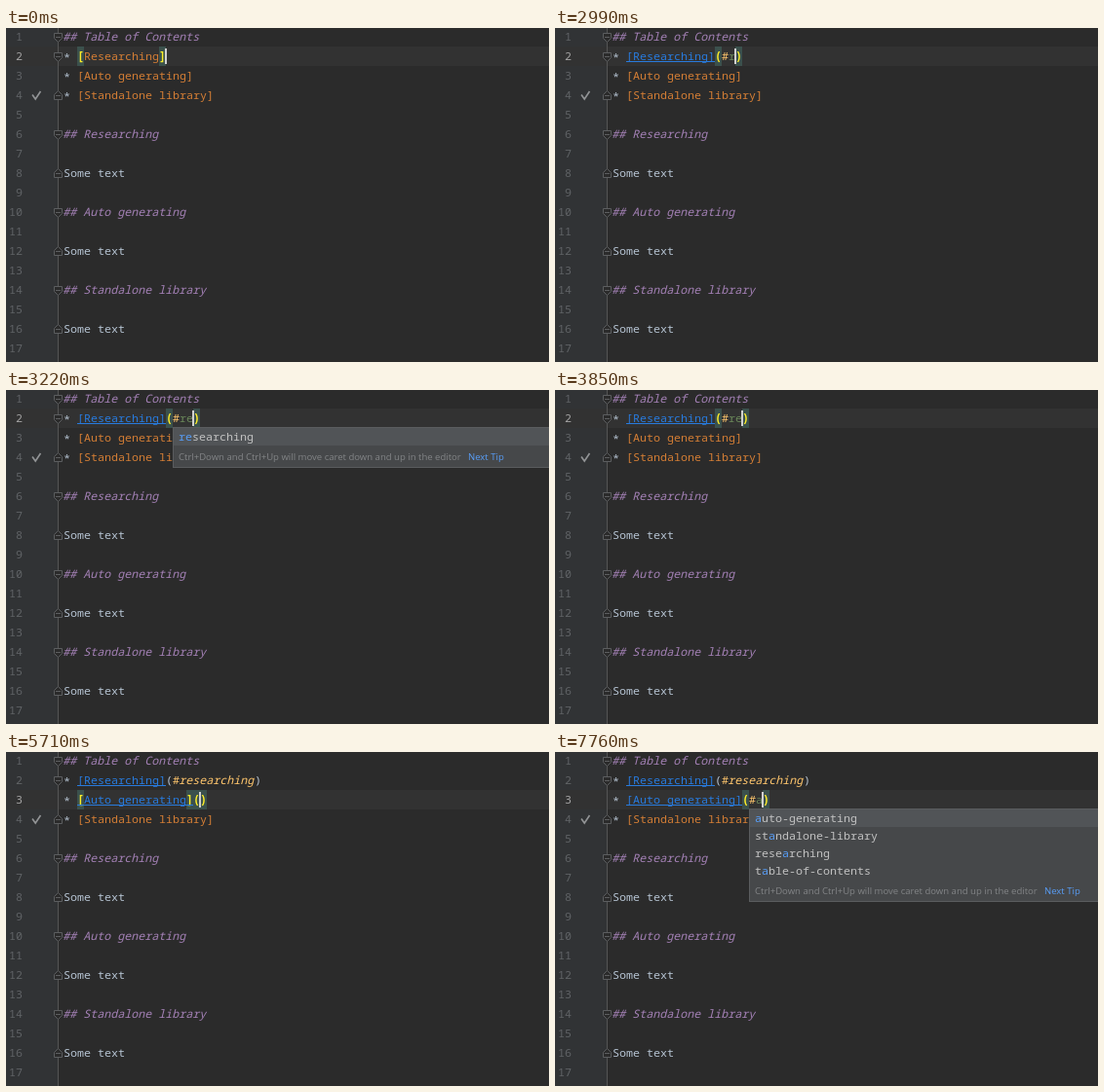
Write an HTML page with a canvas that moves like this. It is 557 px wide and 343 px high and loops after 8 s.

```html
<!DOCTYPE html>
<html lang="en">
<head>
<meta charset="utf-8">
<title>Editor completion</title>
<style>
html, body { margin: 0; width: 557px; height: 343px; overflow: hidden; background: #2b2b2b; }
canvas { display: block; }
</style>
</head>
<body>
<canvas id="stage" width="557" height="343"></canvas>
<script>
const ctx = document.getElementById('stage').getContext('2d');
const W = 557, H = 343, LOOP = 8000;
const LEFT = 59, CH = 7, ROW = 20;
const SLANT = 0.7; // keeps slanted letters centred in their cells
const MONO = '11.667px "Noto Sans Mono", "DejaVu Sans Mono", monospace';
const TIP = '9.55px "Open Sans", "Noto Sans", sans-serif';
const C = {
  text: '#b6c4d3', head: '#a481b6', label: '#d47e35', link: '#287bde',
  anchor: '#ffc66d', typed: '#6a8759', match: '#ffef28', matchBg: '#3b514d',
  num: '#606366', numNow: '#a4a3a3', fold: '#5c5e60', check: '#929496',
  popup: '#46484a', picked: '#515457', item: '#c2c2c2', hit: '#589df6', tip: '#828486'
};
const headings = { 1: 'Table of Contents', 6: 'Researching', 10: 'Auto generating', 14: 'Standalone library' };
const items = { 2: '[Researching]', 3: '[Auto generating]', 4: '[Standalone library]' };
const anchors = ['auto-generating', 'standalone-library', 'researching', 'table-of-contents'];

const pair2 = [[2, 2], [2, 14]], pair3 = [[3, 2], [3, 18]];
const parens = (row, open, close) => [[row, open], [row, close]];

// Each step changes part of the editor state from its time on.
const start = { row: 2, col: 15, on: true, tails: {}, linked: [], lit: [], known: [], marks: pair2, query: '' };
const steps = [
  [130, { on: false }],
  [680, { on: true }],
  [1140, { on: false }],
  [1520, { on: true, col: 16, tails: { 2: '()' }, marks: [...pair2, ...parens(2, 15, 16)] }],
  [1830, { linked: [2] }],
  [2210, { col: 17, tails: { 2: '(#)' }, marks: [...pair2, ...parens(2, 15, 17)] }],
  [2530, { lit: [2] }],
  [2990, { col: 18, tails: { 2: '(#r)' }, marks: parens(2, 15, 18) }],
  [3070, { query: 'r' }],
  [3150, { col: 19, tails: { 2: '(#re)' }, marks: parens(2, 15, 19) }],
  [3220, { query: 're' }],
  [3850, { query: '' }],
  [3920, { col: 28, tails: { 2: '(#researching)' }, marks: parens(2, 15, 28) }],
  [4150, { known: [2] }],
  [4550, { row: 3, col: 19, marks: pair3 }],
  [5160, { on: false }],
  [5390, { on: true, col: 20, tails: { 2: '(#researching)', 3: '()' }, marks: [...pair3, ...parens(3, 19, 20)] }],
  [5710, { linked: [2, 3] }],
  [6180, { col: 21, tails: { 2: '(#researching)', 3: '(#)' }, marks: parens(3, 19, 21) }],
  [6490, { lit: [2, 3] }],
  [7110, { on: false }],
  [7660, { on: true, col: 22, tails: { 2: '(#researching)', 3: '(#a)' }, marks: parens(3, 19, 22) }],
  [7760, { query: 'a' }]
];

function stateAt(t) {
  const s = { ...start };
  for (const [at, change] of steps) if (t >= at) Object.assign(s, change);
  return s;
}

const colX = col => LEFT + col * CH;
const topOf = row => row * ROW - 21;
const baseOf = row => row * ROW - 7;

function rect(x, y, w, h, color) {
  ctx.fillStyle = color;
  ctx.fillRect(x, y, w, h);
}

function write(str, x, y, color, style = '', font = MONO) {
  ctx.font = style + ' ' + font;
  ctx.fillStyle = color;
  ctx.fillText(str, style === 'italic' ? x - SLANT : x, y);
}

function foldMark(row, down) {
  const cy = topOf(row) + 10.5, d = down ? 1 : -1;
  ctx.beginPath();
  ctx.moveTo(49.5, cy - 4 * d);
  ctx.lineTo(57.5, cy - 4 * d);
  ctx.lineTo(57.5, cy + 1 * d);
  ctx.lineTo(53.5, cy + 5 * d);
  ctx.lineTo(49.5, cy + 1 * d);
  ctx.closePath();
  ctx.fillStyle = '#2b2b2b';
  ctx.fill();
  ctx.strokeStyle = C.fold;
  ctx.lineWidth = 1;
  ctx.stroke();
  rect(51, Math.floor(cy), 5, 1, C.fold);
}

function drawGutter(s) {
  for (let n = 1; n <= 17; n++) {
    const str = String(n);
    write(str, 17 - str.length * CH, baseOf(n), n === s.row ? C.numNow : C.num);
  }
  rect(53, 0, 1, H, '#555555');
  [1, 2, 6, 10, 14].forEach(n => foldMark(n, true));
  [4, 8, 12, 16].forEach(n => foldMark(n, false));
  ctx.beginPath();
  ctx.moveTo(27, 68.5);
  ctx.lineTo(30.2, 73);
  ctx.lineTo(35.5, 65);
  ctx.strokeStyle = C.check;
  ctx.lineWidth = 1.6;
  ctx.stroke();
}

// Everything on a list row, as [column, text, color, style].
function itemRuns(row, s) {
  const label = items[row], tail = s.tails[row] || '';
  const linked = s.linked.includes(row);
  const runs = [[0, '*', C.text], [2, label, linked ? C.link : C.label]];
  const open = 2 + label.length;
  if (tail) {
    const word = tail.slice(2, -1), known = s.known.includes(row);
    runs.push([open, '(', C.text], [open + tail.length - 1, ')', C.text]);
    if (tail[1] === '#') runs.push([open + 1, '#', s.lit.includes(row) ? C.anchor : C.text]);
    if (word) runs.push([open + 2, word, known ? C.anchor : C.typed, known ? 'italic' : '']);
  }
  return runs;
}

function drawItem(row, s) {
  const y = baseOf(row), marks = s.marks.filter(m => m[0] === row).map(m => m[1]);
  marks.forEach(col => rect(colX(col), topOf(row), CH, ROW, C.matchBg));
  for (const [col, str, color, style] of itemRuns(row, s)) {
    [...str].forEach((ch, i) => {
      const hit = marks.includes(col + i);
      write(ch, colX(col + i), ch === '*' ? y + 1 : y, hit ? C.match : color, hit ? 'bold' : style);
    });
  }
  if (s.linked.includes(row)) rect(colX(2), y + 1, items[row].length * CH, 1, C.link);
}

function drawPopup(s) {
  const q = s.query;
  const list = anchors.filter(a => a.includes(q))
    .sort((a, b) => b.startsWith(q) - a.startsWith(q));
  const x = colX(3 + items[s.row].length), y = s.row * ROW - 2;
  const h = list.length * 18 + 24, tipY = y + 16 + list.length * 18;
  rect(x, y, W - x, h, '#5a5c5e');
  rect(x + 1, y + 1, W - x - 1, h - 2, C.popup);
  rect(x + 1, y + 1, W - x - 1, 18, C.picked);
  list.forEach((name, i) => {
    const ty = y + 14 + i * 18, at = name.indexOf(q);
    write(name.slice(0, at), x + 6, ty, C.item);
    write(q, x + 6 + at * CH, ty, C.hit);
    write(name.slice(at + q.length), x + 6 + (at + q.length) * CH, ty, C.item);
  });
  write('Ctrl+Down and Ctrl+Up will move caret down and up in the editor', x + 6, tipY, C.tip, '', TIP);
  write('Next Tip', x + 303, tipY, C.hit, '', TIP);
}

function draw(t) {
  const s = stateAt(t);
  rect(0, 0, W, H, '#2b2b2b');
  rect(0, 0, 53, H, '#313335');
  rect(0, topOf(s.row), W, ROW, '#323232');
  drawGutter(s);
  for (const n in headings) write('## ' + headings[n], LEFT, baseOf(n), C.head, 'italic');
  [8, 12, 16].forEach(n => write('Some text', LEFT, baseOf(n), C.text));
  [2, 3, 4].forEach(n => drawItem(n, s));
  if (s.on) rect(colX(s.col) - 1, topOf(s.row) + 2, 2, 16, '#d0d0d0');
  if (s.query) drawPopup(s);
}

const t0 = performance.now();
function tick() {
  draw((performance.now() - t0) % LOOP);
  requestAnimationFrame(tick);
}
tick();
</script>
</body>
</html>
```
